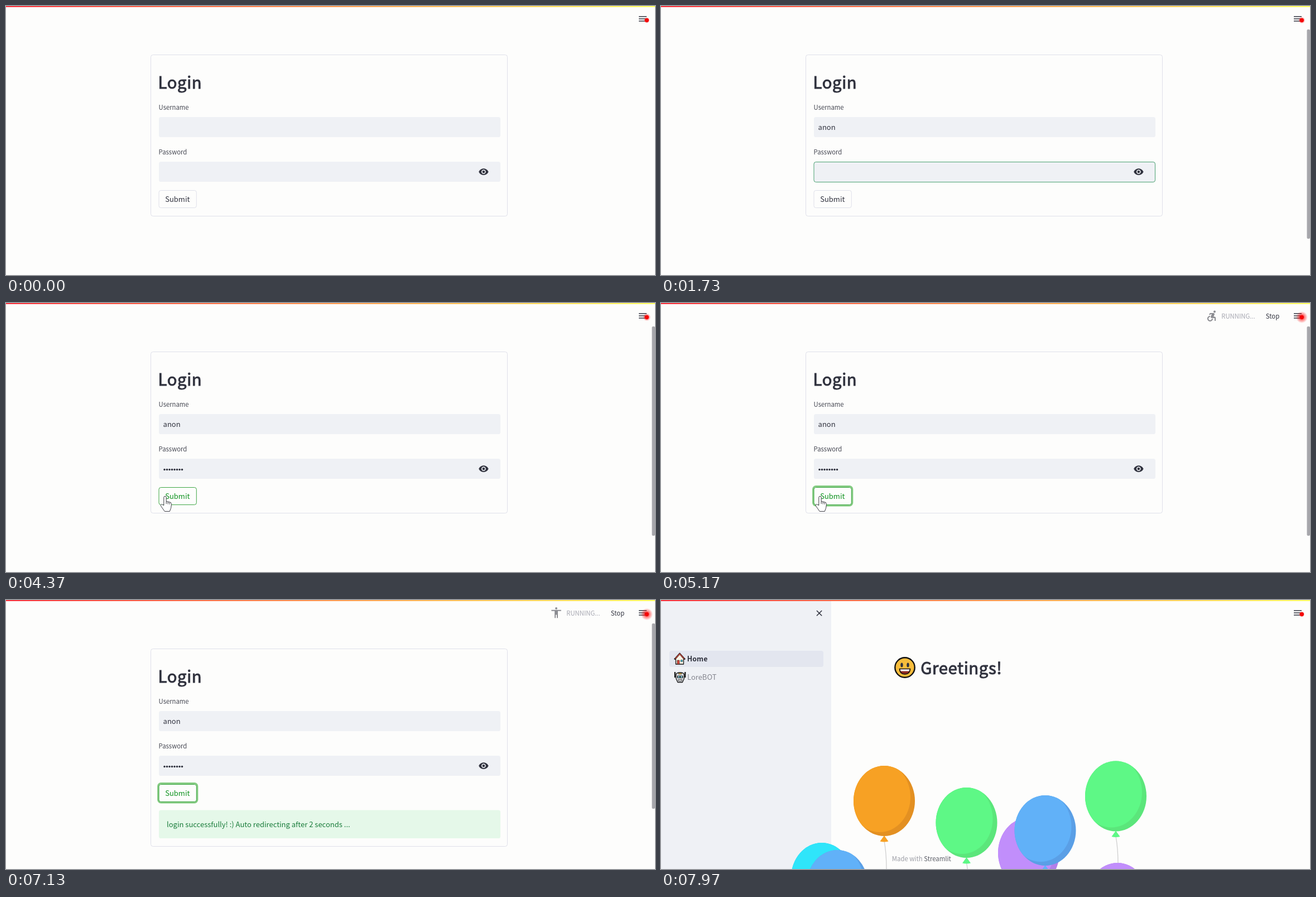
Animation of 1163 by 482 pixels, one loop 8 s. Source, as an HTML page:

```html
<!DOCTYPE html>
<html lang="en">
<head>
<meta charset="utf-8">
<title>Login</title>
<style>
  html, body { margin: 0; width: 100%; height: 100%; overflow: hidden; background: #fdfdfc; }
  svg { display: block; width: 100vw; height: 100vh; }
  text {
    font-family: "Noto Sans CJK JP", "Noto Sans CJK SC", "Noto Sans CJK KR", "Noto Sans CJK", "Open Sans", sans-serif;
    font-size: 13px; fill: #31333f; white-space: pre;
  }
  .small { font-size: 11.3px; }
  .label { fill: #454752; }
  /* a stroked regular stands in for semibold */
  .title { font-size: 29.2px; letter-spacing: .65px; stroke: #31333f; stroke-width: 1; }
  .field { fill: #eff1f5; }
  .line { fill: none; stroke: #dfe0ea; }
  .ink { fill: #31333f; }
</style>
</head>
<body>
<svg viewBox="0 0 1163 482" xmlns="http://www.w3.org/2000/svg">
  <defs>
    <linearGradient id="strip">
      <stop offset="0" stop-color="#f8303c"/>
      <stop offset=".5" stop-color="#ff9a50"/>
      <stop offset="1" stop-color="#ffff62"/>
    </linearGradient>
    <radialGradient id="halo">
      <stop offset="0" stop-color="#f00" stop-opacity=".9"/>
      <stop offset=".4" stop-color="#f00" stop-opacity=".55"/>
      <stop offset="1" stop-color="#f00" stop-opacity="0"/>
    </radialGradient>
    <clipPath id="skin"><ellipse rx="55" ry="63"/></clipPath>
  </defs>
  <rect width="1163" height="482" fill="#fdfdfc"/>

  <g id="login">
    <rect id="form" class="line" x="259.5" y="87.5" width="639" height="289" rx="4"/>
    <text class="title" x="272.6" y="147.5">Login</text>
    <text class="small label" x="273.6" y="185.6">Username</text>
    <rect class="field" x="274" y="199" width="612" height="36" rx="3.6"/>
    <text id="name" x="281.6" y="222.4"></text>
    <text class="small label" x="273.6" y="265.6">Password</text>
    <rect class="field" x="274" y="279" width="612" height="36" rx="3.6"/>
    <g id="dots" class="ink"></g>
    <path class="ink" transform="translate(846.4 287.6) scale(.79)" d="M12 4.5C7 4.5 2.73 7.61 1 12c1.73 4.39 6 7.5 11 7.5s9.27-3.11 11-7.5c-1.73-4.39-6-7.5-11-7.5zM12 17c-2.76 0-5-2.24-5-5s2.24-5 5-5 5 2.24 5 5-2.24 5-5 5zm0-8c-1.66 0-3 1.34-3 3s1.34 3 3 3 3-1.34 3-3-1.34-3-3-3z"/>
    <rect id="focus" x="274" width="611.5" height="36" rx="3.6" fill="none" stroke="#4aa172"/>
    <rect id="caret" class="ink" width="1.2" height="17.5"/>
    <rect id="ring" x="272.6" y="328.6" width="70.2" height="34.4" rx="5" fill="none" stroke="#84cb82" stroke-width="3"/>
    <rect id="button" class="line" x="274" y="330.5" width="67.3" height="31" rx="3.6"/>
    <text id="submit" x="285.2" y="350.8">Submit</text>
    <g id="notice">
      <rect x="274" y="376.5" width="612" height="50.5" rx="3.6" fill="#e5f8e9"/>
      <text id="count" x="288" y="406.6" style="fill:#1b7d3c"></text>
    </g>
    <rect id="scroll" x="1157.5" y="42" width="5.5" rx="2" fill="#a6a6ab"/>
  </g>

  <g id="home">
    <rect width="305" height="482" class="field"/>
    <path d="M279 19l9.2 9.2M288.2 19l-9.2 9.2" stroke="#31333f" stroke-width="1.6"/>
    <rect x="15" y="91" width="276" height="29" rx="4" fill="#e3e6ef"/>
    <g stroke="#151515" stroke-width="1.3" stroke-linejoin="round">
      <path d="M26.5 105v10h14v-10l-7-8z" fill="#fbf3e4"/>
      <path d="M24 106.5l9.5-10.5 9.5 10.5" fill="none" stroke-width="2.6"/>
      <path d="M25.5 105.2l8-8.7 8 8.7" fill="none" stroke="#d8483c" stroke-width="1.3"/>
      <path d="M29 115v-7h4v7z" fill="#d8483c" stroke-width=".6"/>
      <path d="M35.5 107.5h3v3h-3z" fill="#43cdea" stroke-width=".6"/>
      <path d="M25 129v10M43.3 129v10" stroke-width="2.2"/>
      <path d="M27 134q0-4 7.2-4t7.2 4v7l-3 6.5h-8.4l-3-6.5z" fill="#d9dce0"/>
      <path d="M31.5 131h5.4v2h-5.4z" fill="#f3b93b" stroke-width=".5"/>
      <path d="M29.5 136h9.4v3.6h-9.4z" fill="#222" stroke-width=".8"/>
      <path d="M31 142.5h6.4v2.5h-6.4z" fill="#fff" stroke-width=".8"/>
    </g>
    <circle cx="31.9" cy="137.8" r="1.5" fill="#8de4f5"/>
    <circle cx="36.5" cy="137.8" r="1.5" fill="#8de4f5"/>
    <text x="46.8" y="110.3" style="font-weight:600;font-size:12.5px">Home</text>
    <text x="47" y="143" style="fill:#85868f">LoreBOT</text>
    <circle cx="437" cy="121" r="17.7" fill="#f7bd3c" stroke="#111" stroke-width="2.4"/>
    <g class="ink">
      <ellipse cx="431.5" cy="116.5" rx="2.2" ry="4"/>
      <ellipse cx="442.5" cy="116.5" rx="2.2" ry="4"/>
    </g>
    <path d="M427.5 123.5h19q-.5 9.5-9.5 9.5t-9.5-9.5z" fill="#8f2a22" stroke="#111" stroke-width="1.6"/>
    <path d="M428.5 124.3h17l-1 3.2h-15z" fill="#fff"/>
    <text class="title" x="465.3" y="133">Greetings!</text>
    <text x="413.8" y="467.5" style="font-size:11.35px;fill:#9b9ca4">Made with <tspan fill="#5b5d66">Streamlit</tspan></text>
    <g id="balloons"></g>
  </g>

  <rect width="1163" height="2" fill="url(#strip)"/>
  <g id="running">
    <g fill="#8c8d92">
      <path id="chair" transform="translate(974 11)" d="M20 4.54a2 2 0 1 1-4 0a2 2 0 1 1 4 0zM15 17h-2c0 1.65-1.35 3-3 3s-3-1.35-3-3 1.35-3 3-3v-2c-2.76 0-5 2.24-5 5s2.24 5 5 5 5-2.24 5-5zm3-3.5h-1.86l1.67-3.67C18.42 8.5 17.44 7 15.96 7h-5.2c-.81 0-1.54.47-1.87 1.2L8.22 10l1.92.53.65-1.53H13l-1.83 4.1c-.6 1.33.39 2.9 1.85 2.9H18v5h2v-5.5c0-1.1-.9-2-2-2z"/>
      <path id="person" transform="translate(974.4 11) scale(.97)" d="M12 2c1.1 0 2 .9 2 2s-.9 2-2 2-2-.9-2-2 .9-2 2-2zm9 7h-6v13h-2v-6h-2v6H9V9H3V7h18v2z"/>
    </g>
    <text class="small" x="1004.3" y="27.5" style="fill:#a6a7b1">RUNNING...</text>
    <text class="small" x="1083.8" y="27.5">Stop</text>
  </g>
  <path d="M1134 19h14M1134 23h14M1134 27h14" stroke="#31333f" stroke-width="1.6"/>
  <circle id="glow" cx="1148.3" cy="25.5" fill="url(#halo)"/>
  <circle cx="1148.3" cy="25.5" r="3.7" fill="#f40808"/>

  <g id="pointer" fill="#fff" stroke="#3a3a42" stroke-linejoin="round">
    <path id="arrow" d="M0 0V20.5L5 16l3 7 3.2-1.4-3-6.6H15Z"/>
    <path id="hand" transform="translate(-9.2 -.5)" d="M7 17V3a2.2 2.2 0 0 1 4.4 0v7l6.5 1.4c2 .5 3 1.8 2.8 4l-.9 6.5-2.3 6h-9l-6.6-9.5c-1.4-2.2 1-4.2 3-2.4zM11.4 10v4.5M14.5 11v4M17.6 11.8v3.5"/>
  </g>
</svg>
<script>
const LOOP = 8000, HOME = 7420;
const $ = id => document.getElementById(id);
const set = (id, attrs) => { for (const k in attrs) $(id).setAttribute(k, attrs[k]); };
const show = (id, on) => set(id, { display: on ? "inline" : "none" });
const clamp = v => Math.max(0, Math.min(1, v));
const typed = (t, start, gap, max) => Math.max(0, Math.min(max, Math.floor((t - start) / gap) + 1));

// light and shaded tone
const TONES = {
  orange: ["#f7a124", "#e39022"], green: ["#5ef886", "#5be67b"], blue: ["#61b1f8", "#5a9fe6"],
  purple: ["#c18efb", "#b27ee9"], cyan: ["#2fe5fa", "#2acfe6"]
};
const BALLOONS = [
  ["cyan", 288, 498], ["blue", 316, 511], ["orange", 400, 360], ["green", 547.5, 399],
  ["purple", 659, 453], ["blue", 688.5, 413], ["green", 815, 351.5], ["purple", 818, 534]
];
$("balloons").innerHTML = BALLOONS.map(([tone, x, y]) => {
  const [light, shade] = TONES[tone];
  return `<g transform="translate(${x} ${y})">
    <path d="M0 72q6 32 3 80t2 80" fill="none" stroke="#cfcfcf" stroke-width="1.3"/>
    <path d="M0 62l7.5 10.5q-7.5 2-15 0z" fill="${light}"/>
    <ellipse rx="55" ry="63" fill="${shade}"/>
    <g clip-path="url(#skin)"><ellipse cx="-8" cy="-7" rx="55" ry="63" fill="${light}"/></g></g>`;
}).join("");

$("dots").innerHTML = Array.from({ length: 8 }, (_, i) =>
  `<circle cx="${284 + i * 4.5}" cy="298.6" r="1.75"/>`).join("");

// time, x, y
const PATH = [[4000, 430, 225], [4200, 285, 346], [5250, 285, 346], [6000, 558, 193], [6500, 760, -25]];
function pointerAt(t) {
  const i = PATH.findIndex((p, n) => n && t < p[0]);
  if (i < 1 || t < PATH[0][0]) return null;
  const [a, b] = [PATH[i - 1], PATH[i]];
  const u = clamp((t - a[0]) / (b[0] - a[0])), e = u * u * (3 - 2 * u);
  return [a[1] + (b[1] - a[1]) * e, a[2] + (b[2] - a[2]) * e];
}

function drawLogin(t) {
  const letters = typed(t, 620, 140, 4), dots = typed(t, 1950, 140, 8);
  $("name").textContent = "anon".slice(0, letters);
  [...$("dots").children].forEach((dot, i) => dot.setAttribute("display", i < dots ? "inline" : "none"));

  const first = t < 1200, focused = t >= 400 && t < 4150;
  show("focus", focused);
  set("focus", { y: first ? 199.5 : 279.5 });
  // the blink restarts with each key
  const lastKey = first
    ? (letters ? 620 + (letters - 1) * 140 : 400)
    : (dots ? 1950 + (dots - 1) * 140 : 1200);
  show("caret", focused && (t - lastKey) % 1000 < 500);
  set("caret", first
    ? { x: 281.6 + (letters ? $("name").getComputedTextLength() : 0), y: 209 }
    : { x: dots ? 281.2 + dots * 4.5 : 281.6, y: 289 });

  const green = t >= 4150, done = t >= 5400;
  $("button").style.stroke = green ? "#3fa645" : "";
  $("submit").style.fill = green ? "#0f9320" : "";
  show("ring", t >= 4600);
  show("notice", done);
  $("count").textContent = `login successfully! :) Auto redirecting after ${t < 6400 ? 3 : 2} seconds ...`;
  set("form", { height: done ? 354 : 289 });
  show("scroll", t >= 350);
  set("scroll", { height: done ? 332 : 375 });
}

function draw(t) {
  const home = t >= HOME;
  show("login", !home);
  show("home", home);
  if (home) {
    const u = clamp((t - 7550) / 420);
    set("balloons", { transform: `translate(0 ${270 * (1 - u * u)})` });
  } else drawLogin(t);

  show("running", t >= 5000 && !home);
  show("chair", t < 6500);
  show("person", t >= 6500);
  set("glow", { r: 5.2 + 5.8 * (1 - Math.cos(t * Math.PI / 1000)) / 2 });

  const spot = pointerAt(t);
  show("pointer", spot);
  if (spot) {
    const over = spot[0] < 341 && spot[1] > 330;
    set("pointer", { transform: `translate(${spot})` });
    show("hand", over);
    show("arrow", !over);
  }
}

const start = performance.now();
function tick() {
  draw((performance.now() - start) % LOOP);
  requestAnimationFrame(tick);
}
tick();
</script>
</body>
</html>
```
